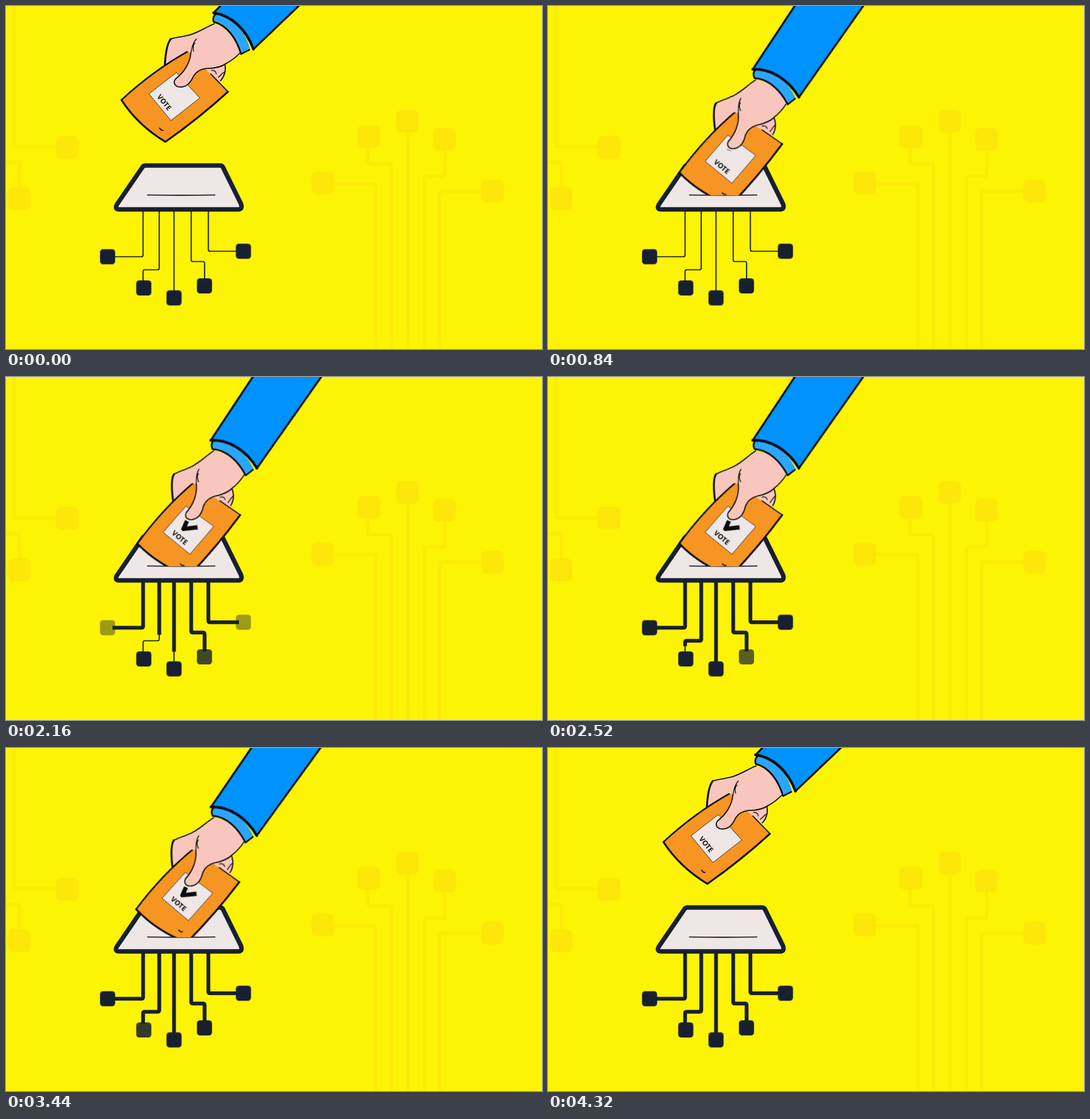
These frames come from a looping animation (780 px wide and 500 px high, 4.36 s). An HTML page:

```html
<!DOCTYPE html>
<html lang="en">
<head>
<meta charset="utf-8">
<title>Digital vote</title>
<style>
html, body { margin: 0; width: 100%; height: 100%; overflow: hidden; background: #fdf304; }
svg { display: block; width: 100%; height: 100%; }

.ghost path { fill: none; stroke: #fcea07; stroke-width: 4.5; stroke-linejoin: round; }
.ghost use { fill: #fce709; }
.wire path { fill: none; stroke: #18202f; stroke-linejoin: round; }
.thin path { stroke-width: 1.7; }
.thick path { stroke-width: 5.5; stroke-dasharray: 1 2; animation: 4360ms infinite cubic-bezier(.37, 0, .63, 1); }
.nodes use { fill: #18202f; animation: pulse 4360ms infinite cubic-bezier(.37, 0, .63, 1); animation-delay: calc(var(--at) - 4360ms); }

.ink { fill: none; stroke: #0b0b0b; stroke-width: 1.6; stroke-linecap: round; stroke-linejoin: round; }
.fine { stroke-width: 1.2; }
.bold { stroke-width: 2.7; }
.skin { fill: #f8c6bd; }
.arm {
  transform-origin: 245.5px 131px;
  animation: reach 4360ms infinite cubic-bezier(.37, 0, .63, 1);
}
.tick {
  fill: none; stroke: #0b0b0b; stroke-width: 6.2; stroke-linejoin: round;
  stroke-dasharray: 1 2;
  animation: tick 4360ms infinite cubic-bezier(.37, 0, .63, 1);
}
text { font: 700 10.3px "Open Sans", Lato, sans-serif; text-anchor: middle; fill: #111; }

@keyframes reach {
  0%, 7.11%, 92.7%, 100% { transform: translate(0, 0) rotate(0deg); }
  17.66%, 75.95% { transform: translate(20.5px, 91px) rotate(-11.2deg); }
}
@keyframes tick {
  0%, 18.4% { stroke-dashoffset: 1; }
  29.8%, 91.73% { stroke-dashoffset: 0; }
  91.74%, 100% { stroke-dashoffset: 1; }
}
@keyframes outer {
  0%, 29.82% { stroke-dashoffset: 1; }
  42.2%, 100% { stroke-dashoffset: 0; }
}
@keyframes right {
  0%, 29.82% { stroke-dashoffset: 1; }
  47.7%, 100% { stroke-dashoffset: 0; }
}
@keyframes middle {
  0%, 29.82% { stroke-dashoffset: 1; }
  55.96%, 100% { stroke-dashoffset: 0; }
}
@keyframes left {
  0%, 29.82% { stroke-dashoffset: 1; }
  64.06%, 100% { stroke-dashoffset: 0; }
}
@keyframes pulse {
  0%, 14.68%, 100% { opacity: 1; }
  7.34% { opacity: .42; }
}
</style>
</head>
<body>
<svg viewBox="0 0 780 500" preserveAspectRatio="none">
  <defs>
    <rect id="pad" x="-16.5" y="-16.5" width="33" height="33" rx="8"/>
    <rect id="node" x="-11" y="-11" width="22" height="22" rx="4.5"/>
    <clipPath id="slot"><rect width="780" height="276"/></clipPath>
  </defs>
  <rect width="780" height="500" fill="#fdf304"/>

  <g class="ghost">
    <path d="M11.5 0V202Q11.5 205 14.5 205H75M0 228H17Q19.5 228 19.5 231V267"/>
    <path d="M475 259H535Q538 259 538 262V500M526.5 204V227Q526.5 230 529.5 230H558Q561 230 561 233V500M585 182V500"/>
    <path d="M638.5 208V245Q638.5 248 635.5 248H612Q609 248 609 251V500M694 270H634Q631 270 631 273V500"/>
    <use href="#pad" x="89" y="206"/>
    <use href="#pad" x="19" y="281"/>
    <use href="#pad" x="461" y="258"/>
    <use href="#pad" x="528" y="190"/>
    <use href="#pad" x="584.5" y="168"/>
    <use href="#pad" x="638" y="194"/>
    <use href="#pad" x="708" y="270"/>
  </g>

  <g class="wire thin">
    <path d="M199.5 298V363Q199.5 365.5 197 365.5H157"/>
    <path d="M223 298V382Q223 384.5 220.5 384.5H202Q199.5 384.5 199.5 387V402"/>
    <path d="M244.5 298V417"/>
    <path d="M269.5 298V370Q269.5 372.5 272 372.5H286.5Q289 372.5 289 375V399"/>
    <path d="M294.5 298V355Q294.5 357.5 297 357.5H337"/>
  </g>
  <g class="wire thick">
    <path pathLength="1" style="animation-name:outer" d="M199.5 298V363Q199.5 365.5 197 365.5H155"/>
    <path pathLength="1" style="animation-name:left" d="M223 298V382Q223 384.5 220.5 384.5H202Q199.5 384.5 199.5 387V402"/>
    <path pathLength="1" style="animation-name:middle" d="M244.5 298V417"/>
    <path pathLength="1" style="animation-name:right" d="M269.5 298V370Q269.5 372.5 272 372.5H286.5Q289 372.5 289 375V400"/>
    <path pathLength="1" style="animation-name:outer" d="M294.5 298V355Q294.5 357.5 297 357.5H339"/>
  </g>
  <g class="nodes">
    <use href="#node" x="147.8" y="365.5" style="--at:1840ms"/>
    <use href="#node" x="200.5" y="411" style="--at:2900ms"/>
    <use href="#node" x="244.5" y="425.5" style="--at:2600ms"/>
    <use href="#node" x="288.8" y="408" style="--at:2040ms"/>
    <use href="#node" x="345.5" y="357.5" style="--at:1840ms"/>
  </g>

  <path d="M203 232.5H311.5Q314.5 232.5 315.7 235L342 288.5Q344.5 296.5 338 296.5H165Q157.5 296.5 161.3 289.5L198.5 235Q200 232.5 203 232.5Z"
    fill="#efe6e6" stroke="#18202f" stroke-width="6.6"/>
  <path d="M206 275.5Q255 276.3 304 275.5" fill="none" stroke="#18202f" stroke-width="1.7" stroke-linecap="round"/>

  <g clip-path="url(#slot)">
    <g class="arm">
      <!-- fingers behind the card -->
      <path class="skin" d="M272 41C258 45 246 46 240 48C234 53 231 70 230 92L270 72Z"/>
      <path class="ink bold" d="M240 48C234 54 232 70 231 88"/>
      <path class="skin" d="M318 83C321 91 319 103 313 110L305 110L290 92Z"/>
      <path class="ink" d="M318 84C321 92 318 103 312 109"/>
      <path class="ink fine" d="M299 94Q305 93 306 99M318 96Q314 99 309 104"/>

      <!-- card -->
      <path d="M168 137Q213 95 265 66L323 125Q281 163.500 232 198Q192 174 168 137Z" fill="#f79522"/>
      <path class="ink bold" style="stroke-width:2.2" d="M265 66Q213 95 168 137"/>
      <path class="ink bold" d="M168 137Q192 174 232 198Q281 163.500 323 125"/>
      <path class="ink" d="M323 125L298 99M223.500 178L226 181L228.500 181.500"/>
      <path d="M248 97L282 134L240 167L208 128Z" fill="#efe6e6" stroke="#3a3129" stroke-width=".9"/>
      <text transform="translate(227.5 142.800) rotate(51)">VOTE</text>
      <path class="tick" pathLength="1" d="M245.300 118.500L238 129L258.500 130.600"/>

      <!-- hand and thumb -->
      <path class="skin" d="M303 26C290 31 270 41 252 46L260 65L269 68C268 83 259 97 247 106C242 112 246 119 256 118C265 117 270 109 273 102C277 95 284 92 292 91C302 91 312 90 320 84L342 69C336 48 320 30 303 26Z"/>
      <path class="ink" d="M303 26C290 31 284 37 268 42C256 45 246 46 240 48"/>
      <path class="ink" d="M269 68C268 83 259 97 247 106C242 112 246 119 256 118C265 117 270 109 273 102C277 95 284 92 292 91C302 91 312 90 320 84C328 80 335 74 340 69"/>
      <path class="ink fine" d="M277 48C270 56 271 62 269 68M275 54Q271 58 273 66"/>

      <!-- sleeve -->
      <path d="M306 11C302 14 301 19 302 23C321 28 335 46 342 70L355 63C349 36 330 15 306 11Z" fill="#2ba6ff"/>
      <path class="ink" style="stroke-width:2.4" d="M306 11C302 14 301 19 302 23C321 28 335 46 342 70L354 64"/>
      <path d="M302 10C327 13 350 34 360 63L583 -150H460Z" fill="#0092ff"/>
      <path class="ink bold" d="M460 -150L302 10M360 63L583 -150"/>
      <path class="ink" style="stroke-width:3.8" d="M302 10C327 13 350 34 360 63"/>
    </g>
  </g>
</svg>
</body>
</html>
```
